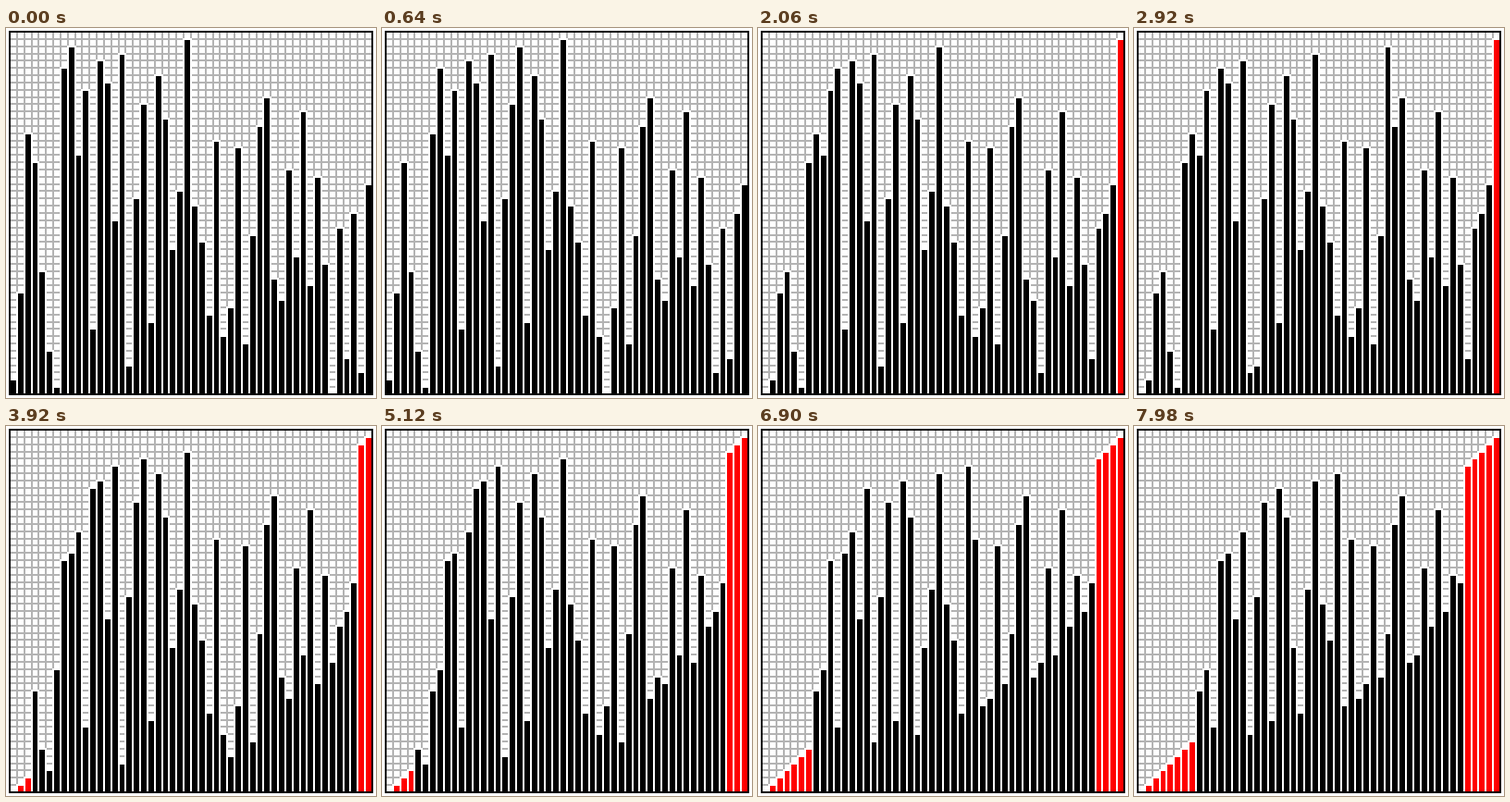
An HTML page with a canvas for the animation above (8 s loop, 400 by 400 pixels).

```html
<!DOCTYPE html>
<html lang="en">
<head>
<meta charset="utf-8">
<title>Two-way bubble sort</title>
<style>
  html, body { margin: 0; width: 100%; height: 100%; overflow: hidden; background: #fff; }
  canvas { display: block; }
</style>
</head>
<body>
<canvas id="stage" width="400" height="400"></canvas>
<script>
const LOOP = 8000, STEP = 20;
const START = [
  2, 14, 36, 32, 17, 6, 1, 45, 48, 33, 42, 9, 46, 43, 24, 47, 4, 27, 40, 10,
  44, 38, 20, 28, 49, 26, 21, 11, 35, 8, 12, 34, 7, 22, 37, 41, 16, 13, 31, 19,
  39, 15, 30, 18, 0, 23, 5, 25, 3, 29
];
const COUNT = START.length;
const LEFT = 4, SIZE = 392;
const ctx = document.getElementById('stage').getContext('2d');

// Cell edges sit on whole pixels; every line is two pixels wide.
const edge = i => Math.round(LEFT + i * SIZE / COUNT);

// Each pass sweeps from both ends at once; only real swaps are recorded.
function recordSwaps(values, limit) {
  const list = values.slice(), swaps = [];
  const compare = i => {
    if (list[i] <= list[i + 1]) return;
    [list[i], list[i + 1]] = [list[i + 1], list[i]];
    swaps.push(i);
  };
  for (let before = -1; swaps.length < limit && swaps.length !== before;) {
    before = swaps.length;
    for (let k = 0; k < COUNT - 1; k++) {
      compare(COUNT - 2 - k);
      compare(k);
    }
  }
  return swaps;
}

const swaps = recordSwaps(START, LOOP / STEP);

function valuesAfter(n) {
  const list = START.slice();
  for (const i of swaps.slice(0, n)) [list[i], list[i + 1]] = [list[i + 1], list[i]];
  return list;
}

function rect(color, x0, y0, x1, y1) {
  ctx.fillStyle = color;
  ctx.fillRect(x0, y0, x1 - x0, y1 - y0);
}

function draw(values) {
  const end = LEFT + SIZE;
  rect('#fff', 0, 0, 400, 400);
  for (let i = 1; i < COUNT; i++) {
    const p = edge(i);
    rect('#b3b3b3', p - 1, LEFT, p + 1, end);
    rect('#b3b3b3', LEFT, p - 1, end, p + 1);
  }
  values.forEach((value, i) => {
    if (!value) return;
    const x0 = edge(i), x1 = edge(i + 1), top = edge(COUNT - value);
    rect('#fff', x0 - 1, top - 1, x1 + 1, end);
  });
  values.forEach((value, i) => {
    if (!value) return;
    const x0 = edge(i), x1 = edge(i + 1), top = edge(COUNT - value);
    rect(value === i ? '#f00' : '#000', x0 + 1, top + 1, x1 - 1, end);
  });
  ctx.strokeStyle = '#000';
  ctx.lineWidth = 2;
  ctx.strokeRect(LEFT, LEFT, SIZE, SIZE);
}

let shown = -1;
function frame() {
  const time = performance.now() % LOOP;
  const n = Math.max(0, Math.floor(time / STEP) - 1);
  if (n !== shown) draw(valuesAfter(shown = n));
  requestAnimationFrame(frame);
}
frame();
</script>
</body>
</html>
```
